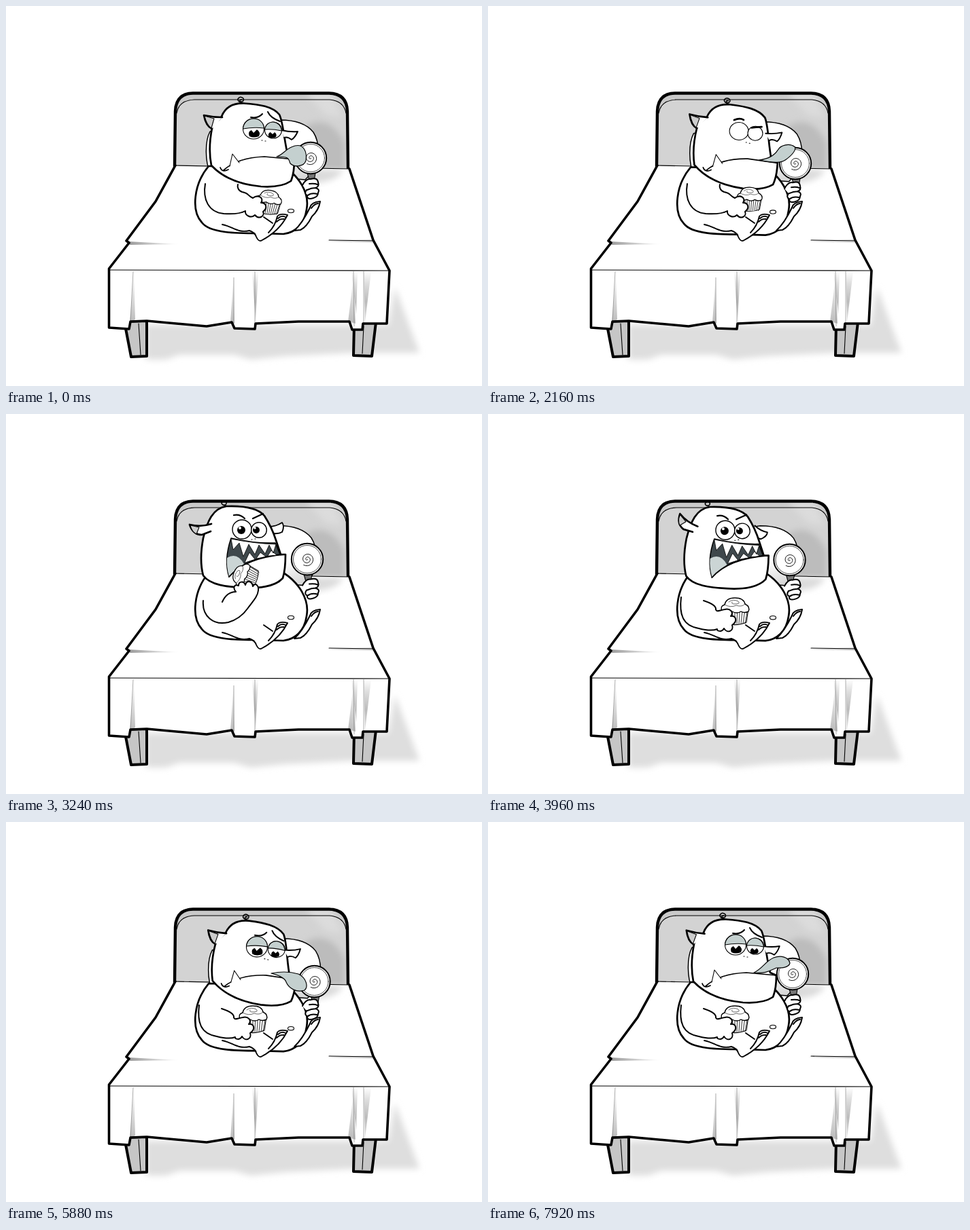
An HTML page that plays this animation: 700x560 px, repeating every 8000 ms.

```html
<!DOCTYPE html>
<html lang="en">
<head>
<meta charset="utf-8">
<title>Monster in bed</title>
<style>
html, body { margin: 0; width: 100%; height: 100%; overflow: hidden; background: #fff; }
svg { display: block; width: 700px; height: 560px; }
.ink { fill: #fff; stroke: #000; stroke-width: 2.7; stroke-linejoin: round; stroke-linecap: round; }
.bold { stroke-width: 4; }
.thin { stroke-width: 1.1; }
.line { fill: none; }
.lid, #tongue { fill: #c4d0cf; }
</style>
</head>
<body>
<svg viewBox="0 0 700 560">
  <defs>
    <filter id="soft" x="-30%" y="-30%" width="160%" height="160%"><feGaussianBlur stdDeviation="5"/></filter>
    <linearGradient id="pleat" x1="0" y1="0" x2="0" y2="1">
      <stop stop-color="#fff"/><stop offset=".5" stop-color="#ddd"/><stop offset="1" stop-color="#bbb"/>
    </linearGradient>
    <linearGradient id="pleatUp" x1="0" y1="0" x2="0" y2="1">
      <stop stop-color="#fff"/><stop offset=".25" stop-color="#ddd"/><stop offset=".6" stop-color="#bbb"/><stop offset="1" stop-color="#ddd"/>
    </linearGradient>
    <linearGradient id="crease">
      <stop stop-color="#999"/><stop offset="1" stop-color="#fff"/>
    </linearGradient>
    <linearGradient id="pillowFill" x1=".3" y1="0" x2="1" y2="1">
      <stop offset=".6" stop-color="#fff"/><stop offset="1" stop-color="#ccc"/>
    </linearGradient>
    <clipPath id="board"><path d="M247 236L249 155Q249 129 275 129H475Q501 129 502 155L504 240Z"/></clipPath>
  </defs>

  <g id="bed">
    <path d="M206 470H562L572 414L608 511L510 511L410 516L360 521L335 514L255 514L235 521H206Z" fill="#dedede" filter="url(#soft)"/>
    <path class="ink bold" d="M174 465L184 517L207 516V464Z" style="fill:#c6c6c6"/>
    <path class="ink bold" d="M512 468L511 515L538 516L544 466Z" style="fill:#c6c6c6"/>
    <path class="ink thin line" d="M195 468L198 514M526 472L524 512"/>
    <g clip-path="url(#board)">
      <path d="M240 120H510V245H240Z" fill="#d3d3d3"/>
      <path d="M251 158Q253 139 277 138H476Q498 139 500 158V125H251Z" fill="#c9c9c9"/>
      <path d="M440 128H480L494 165L470 160Z" fill="#dcdcdc" filter="url(#soft)"/>
      <path d="M440 178C465 160 490 180 498 204V250H430Z" fill="#bcbcbc" filter="url(#soft)"/>
    </g>
    <path class="ink thin line" d="M251 158Q254 139 277 138H476Q497 140 500 158"/>
    <path class="ink bold line" d="M248 236L249 155Q250 129 275 128.500H475Q501 129 502 155L503 240" style="stroke-width:4.4"/>
    <path d="M249 235L220 288L177 346L181 349L151.500 387V474L181 476L183 465L207 464L295 472L332 466L336 475L366 476L367 468L430 465L505 465L509 477H524L525 468H560L564 390L540 345L505 240Z" fill="#fff"/>
    <path d="M440 241H496Q488 259 450 261Z" fill="#dadada" filter="url(#soft)"/>
    <path class="ink thin line" d="M248 235L505 240"/>
    <path d="M180 347L255 351L182 352Z" fill="url(#crease)"/>
    <path d="M538 344L470 347L540 349Z" fill="#ddd"/>
    <path class="ink thin line" d="M475 345L540 346M152 389L564 390"/>
    <path d="M188 391L190 462L182 466Z M335 395L336 468L330 466Z M511 400L514 468L503 465Z" fill="url(#pleat)"/>
    <path d="M362 391H371L367 466Z M526 391H537L528 466Z M508 391H517L515 455Z" fill="url(#pleatUp)"/>
    <path class="line" stroke="#777" stroke-width=".6" d="M187 391L183 464M335 400V468M366 391V468M511 391L512 472M526 391V468"/>
    <path class="ink bold line" d="M249 235L220 288L177 346L181 349L151.500 387V474L181 476L183 465L207 464L295 472L332 466L336 475L366 476L367 468L430 465L505 465L509 477H524L525 468H560L564 390L540 345L505 240" style="stroke-width:3.6"/>
  </g>

  <path id="pillow" class="ink" d="M300 185C292 200 293 230 300 245L440 256L453 242C461 225 462 202 452 186C440 171 420 168 403 168Z" style="fill:url(#pillowFill);stroke-width:1.5"/>

  <g id="body">
    <path class="ink" d="M298 236C276 262 272 302 288 319C300 335 340 335 372 335L408 336C425 334 439 322 442 300C447 275 430 250 408 236Z"/>
    <ellipse class="ink thin" cx="419" cy="302" rx="4.5" ry="2.7"/>
  </g>

  <g id="lolly">
    <path class="ink thin" d="M443 246L448 264H452L455 246Z" style="fill:#777"/>
    <circle class="ink" cx="448" cy="224" r="23.2" style="stroke-width:2"/>
    <circle class="ink thin line" cx="448" cy="224" r="20.5" style="stroke-width:.7"/>
    <path id="swirl" class="ink line" style="stroke-width:.9"/>
  </g>
  <path id="fist" class="ink" style="stroke-width:2" d="M436 264Q441 254 448 255Q458 252 459 260Q461 266 455 268Q462 270 459 275Q459 281 452 283Q442 286 443 279Q438 277 442 271M446 262Q454 261 458 263M443 271Q449 268 455 268M444 279Q449 275 458 277"/>

  <g id="legs">
    <path class="ink" style="stroke-width:2" d="M424 331Q436 320 447 297Q449 289 462 288Q460 301 450 310Q442 326 433 330ZM449 298Q454 291 459 291"/>
    <path d="M332 320L366 334L373 346L398 331L408 318L413 308L402 307L392 320L378 310Z" fill="#fff"/>
    <path class="ink line" style="stroke-width:1.9" d="M318 322C334 325 340 335 358 331Q366 334 368 340Q371 347 375 346Q402 332 414 308Q403 305 399 310Q396 324 386 334M379 311L392 320M400 313Q405 308 411 311M398 318Q403 313 409 314"/>
  </g>

  <g id="sad">
    <path class="ink" d="M303 180C304 172 312 171 317 163C322 150 333 143 350 143.500C373 145 392 148 402 160C408 172 409 200 415 222L424 226Q424 246 419 258Q404 268 375 266C343 263 318 252 302 235Q297 210 303 180Z"/>
    <g id="sadEarL"><path class="ink" d="M318 164Q305 164 291 161Q294 177 303 181"/>
      <path class="ink thin" d="M292 162L306 166L302 180Q295 175 292 162Z" style="fill:#ccc"/></g>
    <path class="ink thin line" style="stroke-width:1.6" d="M349 143Q340 141 341 137Q344 132 349 136Q351 141 345 141Q342 138 347 138"/>
    <path id="sadEarR" class="ink" style="stroke-width:1.9" d="M405 183Q418 186 429 185Q425 194 420 197Q414 192 409 194"/>
    <path class="ink line" style="stroke-width:1.7" d="M315 238Q318 246 327 241M320 242C332 231 352 223 380 222L424 226"/>
    <path class="ink thin" d="M329 236L333 218L343 231"/>
    <path d="M376 198h1M381 199h1" class="ink thin line"/>
    <g id="droopy">
      <ellipse class="ink thin" cx="364" cy="181" rx="15.5" ry="15"/>
      <ellipse class="ink thin" cx="393" cy="183" rx="12.5" ry="12"/>
      <path d="M358 192Q355 185 361 183L364 187L369 182Q375 186 372 192Q364 195 358 192ZM386 193Q385 187 389 186L392 189L395 186Q399 189 397 193Q391 196 386 193Z"/>
      <path class="ink thin lid" d="M348.500 181C350 161 378 161 379.500 180Q364 178 348.500 181ZM380.500 182C383 167 403 167 405.500 184Q392 181 380.500 182Z"/>
      <path class="ink line" style="stroke-width:2" d="M360 164Q371 166 377 159M385 156Q389 165 403 170"/>
    </g>
    <g id="shut">
      <ellipse class="ink thin" cx="365" cy="182" rx="14" ry="13"/>
      <ellipse class="ink thin" cx="389" cy="184" rx="11" ry="10.500"/>
      <path class="ink line" d="M357 166Q365 162 371 165M383 176Q389 175 398 174"/>
    </g>
  </g>

  <g id="angry">
    <path id="madEarR" class="ink" style="stroke-width:1.9" d="M386 166Q397 166 406 160Q410 165 406 174Q401 177 392 176"/>
    <path class="ink" d="M290 183C296 158 304 139 324 136C350 135 370 138 380 150Q391 167 397 186L404 207L411 207Q411 229 407 242C395 255 370 257 350 256C325 255 300 252 290 238Q284 215 290 183Z"/>
    <g id="madEarL"><path class="ink" d="M302 162Q286 167 270 163Q275 178 288 178L301 173"/>
      <path class="ink thin" d="M271 164L284 167L280 177Q273 173 271 164Z" style="fill:#ccc"/></g>
    <path class="ink thin line" style="stroke-width:1.6" d="M327 136Q317 135 317 131Q320 126 324 130Q325 135 319 134"/>
    <path class="ink" style="fill:#3f484c;stroke-width:1.5" d="M331 183Q365 191 396 190L403 207Q352 212 328 240Q320 215 331 183Z"/>
    <path d="M325 212Q340 203 350 221Q337 229 328 239Q324 225 325 212Z" fill="#cbd5d5"/>
    <path class="ink thin" style="stroke-width:.8" d="M331 184L334 200L343 190L349 210L357 192L366 207L372 193L381 206L387 193L393 205L397 192Q365 191 331 184ZM351 219L358 204L366 214ZM368 213L374 204L382 210ZM385 209L390 201L398 208Z"/>
    <path class="ink line" style="stroke-width:1.7" d="M328 240Q352 212 411 207"/>
    <path d="M361 185h1M366 184h1" class="ink thin line"/>
    <g id="glare">
      <circle class="ink" cx="347" cy="170" r="14" style="stroke-width:1.400"/>
      <circle class="ink" cx="372" cy="171" r="11.300" style="stroke-width:1.400"/>
      <circle cx="346" cy="171" r="6"/><circle cx="368" cy="171" r="5"/>
      <circle cx="344" cy="168" r="2" fill="#fff"/><circle cx="366" cy="168" r="1.700" fill="#fff"/>
    </g>
    <path class="ink line" style="stroke-width:2.300" d="M335 149Q344 147 351 154M363 154L378 147"/>
  </g>

  <g id="cupcake">
    <path class="ink thin" d="M-17 2L-13 24Q3 28 17 22L20 2Z"/>
    <path id="ribs" class="ink thin line" style="stroke-width:.8"/>
    <path class="ink thin" style="stroke-width:1.4" d="M-19 5Q-22 -2 -15 -4Q-13 -14 0 -14Q13 -14 15 -5Q23 -1 20 6Q14 9 9 6Q3 10 -4 6Q-12 9 -19 5Z"/>
    <path class="ink thin line" style="stroke-width:.6" d="M-15 -4Q-6 1 2 -3Q10 0 15 -5M-9 -8Q-3 -13 5 -9Q9 -5 0 -5Q-6 -5 -4 -8"/>
  </g>
  <path id="arm" class="ink" style="stroke-width:2"/>
  <path id="tongue" class="ink" style="stroke-width:1.2"/>
</svg>

<script>
const LOOP = 8000, STEP = 120;
const el = id => document.getElementById(id);
const set = (id, value, name = 'transform') => el(id).setAttribute(name, value);
const show = (id, on) => { el(id).style.display = on ? '' : 'none'; };
const mix = (a, b, k) => a + (b - a) * k;

// Blend two paths that share the same commands.
function blend(a, b, k) {
  const ends = b.match(/-?[\d.]+/g);
  let i = 0;
  return a.replace(/-?[\d.]+/g, n => mix(+n, +ends[i++], k).toFixed(2));
}

// Eased value of a list of [time, value] keys.
function track(keys, t) {
  const i = keys.findIndex(key => key[0] > t);
  if (i === 0) return keys[0][1];
  if (i < 0) return keys[keys.length - 1][1];
  const [t0, v0] = keys[i - 1], [t1, v1] = keys[i];
  const k = (t - t0) / (t1 - t0);
  return mix(v0, v1, k * k * (3 - 2 * k));
}

function sample(list, x) {
  const i = Math.min(Math.floor(x), list.length - 2);
  return [list[i], list[i + 1], x - i];
}

const bob = [[1700, 0], [2040, 10], [2160, 8], [2400, 2], [2640, -13], [2880, -11], [3240, -10],
  [3960, -9], [5160, -8.5], [5400, -7], [5640, 3], [5880, 11], [6240, 8], [6600, 0]];
const tilt = [[1700, 0], [2040, 1], [2400, .4], [5520, .4], [5880, 1], [6120, 1], [6600, 0]];
const sink = [[2400, 4], [2640, -1], [2880, -.3], [3240, 0], [3960, .4], [5160, .6], [5400, 1], [5520, 2.5]];
const reach = [[2400, 0], [2880, 1], [3480, 1], [3840, 2]];
const flap = [[2520, -14], [2760, 10], [3000, -8], [3240, 0], [3600, 0], [3960, 37], [4200, 0],
  [4560, -6], [4920, 3], [5160, 0]];
const droop = [[5400, 0], [5760, 1], [6000, 1], [6360, 0]];

const arms = [
  'M293 262C289 285 298 304 320 306C335 307 345 306 352 302C351 308 360 314 366 308C372 315 381 310 378 303C385 298 383 290 375 290C380 283 371 277 363 283C354 279 358 276 347 274C341 272 340 266 341 263',
  'M290 275C288 298 305 312 327 307C340 303 348 297 355 287C362 277 370 270 371 260C372 252 366 248 363 254C362 246 354 244 352 252C350 246 342 246 342 253C336 250 333 256 338 262C328 262 322 268 318 277',
  'M284 270C281 295 286 312 310 316C322 319 330 320 337 317C336 320 344 322 347 316C352 324 362 320 359 311C368 305 364 296 357 298C362 292 356 286 348 288C338 290 336 292 335 288C336 282 326 278 317 275'
];
const cakes = ['387 284 8 .9', '347 238 -68 .9', '363 285 0 1'];
const tongues = [
  'M390 223C405 220 420 221 430 224C442 230 445 243 439 248C427 252 416 245 412 236C411 231 402 226 390 223',
  'M398 222C408 219 412 209 425 206C438 203 443 215 441 228C438 237 424 238 418 232C415 226 419 222 398 222',
  'M391 222C404 216 408 205 420 200C431 196 442 199 444 208C442 215 432 215 424 215C416 218 410 224 391 222'
];
const raisedTongue = 'M400 228C414 227 423 224 427 215C430 206 444 202 453 208C455 214 448 222 440 229C434 234 424 233 400 228';

let spiral = 'M448 224';
for (let a = 0; a < 15; a += .3)
  spiral += `L${(448 + a * .68 * Math.cos(a)).toFixed(1)} ${(224 + a * .68 * Math.sin(a)).toFixed(1)}`;
set('swirl', spiral, 'd');
let ribs = '';
for (let i = -4; i <= 5; i++) ribs += `M${i * 3.6} 7L${i * 3} 24`;
set('ribs', ribs, 'd');

function draw(t) {
  const mad = t >= 2400 && t < 5520;
  const q = track(bob, t), b = track(tilt, t), k = track(sink, t);
  const wave = Math.sin(t / 960 * 2 * Math.PI);

  show('sad', !mad);
  show('angry', mad);
  show('tongue', !mad);
  const shut = t >= 2040 && t < 5760;
  show('shut', shut);
  show('droopy', !shut);
  show('glare', t < 4560 || t >= 4680);

  set('sad', `translate(0 ${2.5 * b}) rotate(${3.5 * b} 360 262)`);
  set('angry', `translate(${3 * k} ${3 * k}) rotate(${1.2 * k} 350 256)`);
  set('sadEarL', `rotate(${4 * wave * (1 - b)} 310 172)`);
  set('sadEarR', `rotate(${-5 * wave * (1 - b) - 12 * b} 406 187)`);
  const ear = track(flap, t);
  set('madEarL', `rotate(${ear} 300 170)`);
  set('madEarR', `rotate(${ear * 1.2 + 18 * Math.max(0, k - .5)} 392 170)`);

  set('pillow', `translate(${q * .3} ${q * .35})`);
  set('body', `translate(0 ${q * .2})`);
  set('lolly', `translate(${q * .5} ${q})`);
  set('fist', `translate(0 ${q * (q < 0 ? 1.15 : .65)})`);

  const pose = track(reach, t);
  set('arm', blend(...sample(arms, pose)), 'd');
  const [x, y, turn, size] = blend(...sample(cakes, pose)).split(' ');
  const lift = pose < 1 ? b * (1 - pose) : 0;
  set('cupcake', `translate(${x - 3 * lift} ${y - 5 * lift}) rotate(${turn - 8 * lift}) scale(${size})`);

  const lick = mix(wave, -1, track(droop, t));
  let shape = blend(...sample(tongues, lick + 1));
  if (t > 1700 && t < 2400) shape = blend(shape, raisedTongue, b);
  set('tongue', shape, 'd');
}

function play(now) {
  draw(Math.floor(now % LOOP / STEP) * STEP);
  requestAnimationFrame(play);
}
draw(0);
requestAnimationFrame(play);
</script>
</body>
</html>
```
